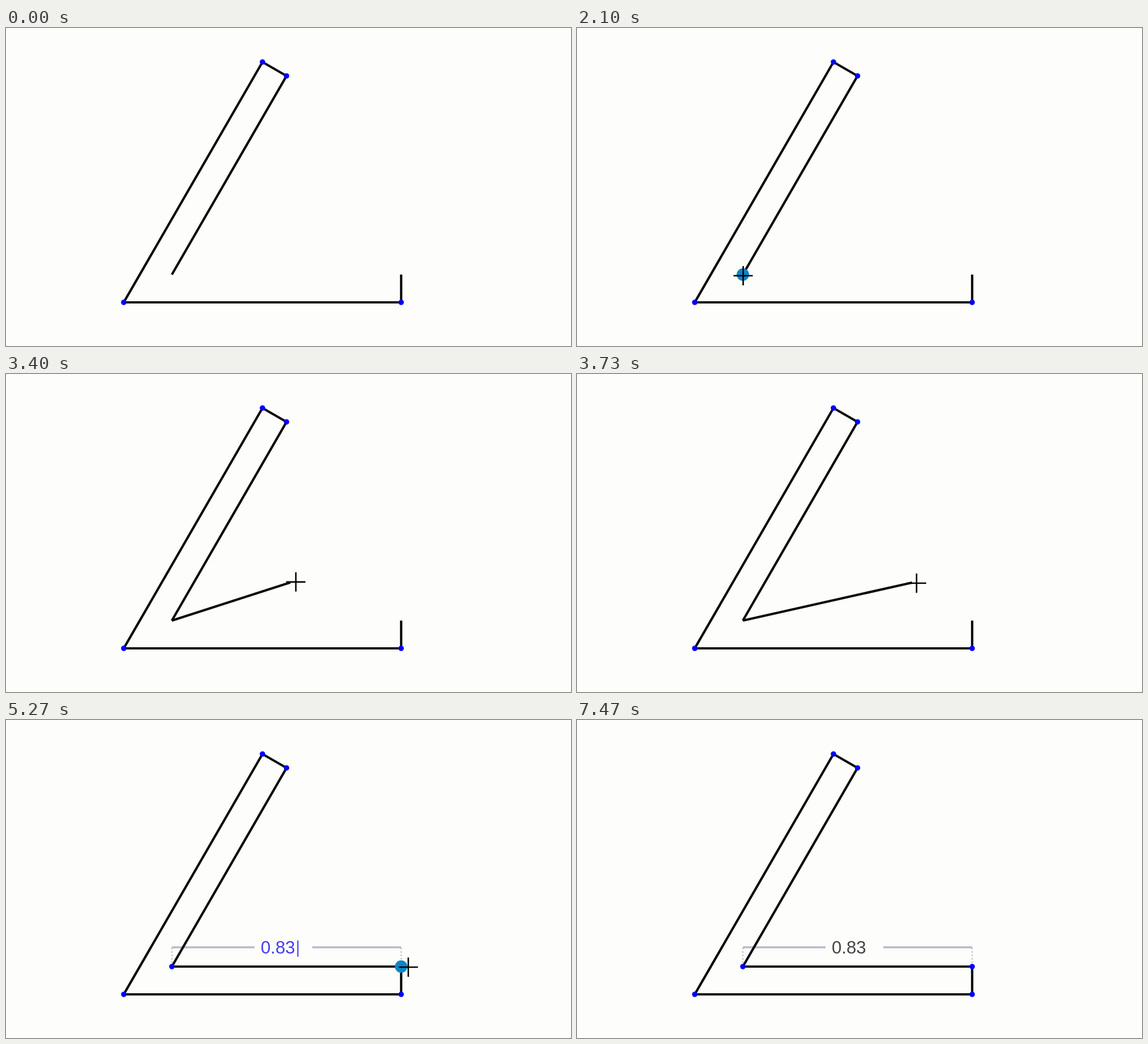
These frames come from a looping animation (998 by 561 pixels, 7510 ms). An HTML page:

```html
<!DOCTYPE html>
<html lang="en">
<head>
<meta charset="utf-8">
<title>Closing an outline</title>
<style>
  html, body { margin: 0; width: 100%; height: 100%; overflow: hidden; background: #fdfdfb; }
  svg { display: block; width: 998px; height: 561px; }
  .soft { filter: blur(.5px); }
  .edge { fill: none; stroke: #0a0a0a; stroke-width: 4.2; }
  .dot { fill: none; stroke: #00f; stroke-width: 9.6; stroke-linecap: round; }
  .rule { stroke: #bab8c8; stroke-width: 3.4; }
  .guide { stroke: #bdbdc6; stroke-width: 2.4; stroke-dasharray: 2.5 3.5; }
  .snap { fill: #0c86c9; }
  .cross { stroke: #000; stroke-width: 2.6; }
  text { font: 31.2px "Liberation Sans", Arial, sans-serif; fill: #444; }
  .editing text { fill: #463cf0; }
  .caret { stroke: #463cf0; stroke-width: 2.2; visibility: hidden; }
  .editing .caret { visibility: inherit; }
</style>
</head>
<body>
<svg viewBox="0 0 998 561">
  <g class="soft">
    <g id="size">
      <path class="guide" d="M293 402V434M698 402V434"/>
      <path class="rule" d="M293 401H439M541 401H698"/>
      <text x="450" y="412">0.83</text>
      <path class="caret" d="M515.5 389V417.5"/>
    </g>
    <path class="edge" d="M293 435L495.5 84.5L453 60L208 484H698V435"/>
    <line class="edge" id="band" x1="293" y1="435"/>
    <path class="dot" d="M453 60h0M495.5 84.5h0M208 484h0M698 484h0"/>
    <path class="dot" id="ends" d="M293 435h0M698 435h0"/>
    <circle class="snap" id="snap" r="11"/>
  </g>
  <path class="cross" id="cross" d="M-17 0H17M0 -17V17"/>
</svg>
<script>
const LOOP = 7510, LAG = 33;
const START = [293, 435], END = [698, 435];
const PRESS = 2500, COMMIT = 4850, ACCEPT = 6250;

const sineOut = u => Math.sin(u * Math.PI / 2);
const cubicOut = u => 1 - (1 - u) ** 3;
const quadIn = u => u * u;

// Each move starts where the one before ended; bow lifts the path into an arc
const entry = [1020, 354];
const moves = [
  { from: 820, to: 2032, end: [293.5, 437], ease: cubicOut },
  { from: 2740, to: 4600, end: [706, 436], ease: sineOut, bow: 71 },
  { from: 4600, to: 5000, end: [710, 436], ease: sineOut },
  { from: 5270, to: 5600, end: [837, 432], ease: sineOut },
  { from: 6250, to: 6800, end: [1020, 418], ease: quadIn }
];

const $ = id => document.getElementById(id);
const show = (el, on) => { el.style.visibility = on ? 'visible' : 'hidden'; };
const near = (p, q) => Math.hypot(p[0] - q[0], p[1] - q[1]) < 18;

function cursorAt(t) {
  let [x, y] = entry;
  for (const { from, to, end, ease, bow = 0 } of moves) {
    if (t < from) break;
    const u = Math.min(1, (t - from) / (to - from)), p = ease(u);
    x += (end[0] - x) * p;
    y += (end[1] - y) * p - bow * Math.sin(Math.PI * u ** 0.8);
  }
  return [x, y];
}

function place(el, names, point) {
  names.forEach((name, i) => el.setAttribute(name, point[i]));
}

function draw(t) {
  const pos = cursorAt(t), done = t >= COMMIT;
  const target = [START, END].find(p => near(pos, p));

  $('cross').setAttribute('transform', `translate(${pos})`);
  show($('snap'), target);
  if (target) place($('snap'), ['cx', 'cy'], target);

  place($('band'), ['x2', 'y2'], done ? END : target || cursorAt(t - LAG));
  show($('band'), t >= PRESS);

  show($('size'), done);
  show($('ends'), done);
  $('size').classList.toggle('editing', t < ACCEPT);
}

const begin = performance.now();
function tick() {
  draw((performance.now() - begin) % LOOP);
  requestAnimationFrame(tick);
}
tick();
</script>
</body>
</html>
```
